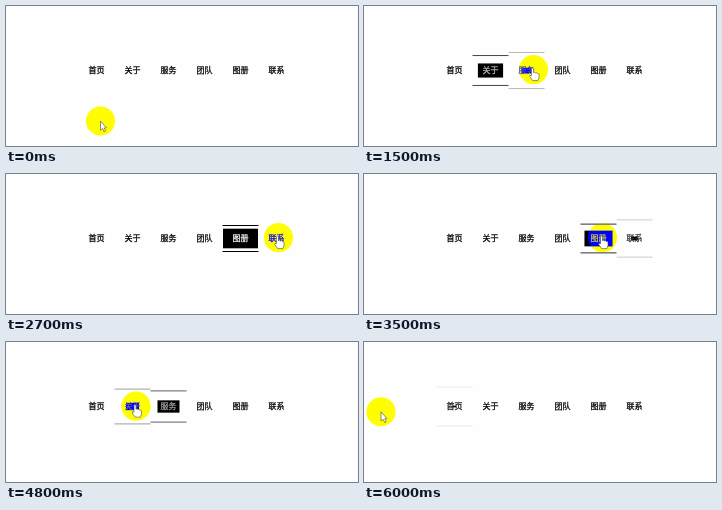
Recreate the animation shown at these times as an HTML page. Size 352x140 px, loop 6100 ms.

```html
<!DOCTYPE html>
<html lang="zh">
<head>
<meta charset="utf-8">
<title>Menu hover</title>
<style>
  html, body { margin: 0; width: 100%; height: 100%; overflow: hidden; background: #fefefe; }
  svg { display: block; width: 352px; height: 140px; isolation: isolate; }
  text { font: 500 8px "Noto Sans CJK SC", "Noto Sans CJK", sans-serif; text-anchor: middle; stroke-width: .25px; }
  #spot { fill: #00f; mix-blend-mode: difference; }
  #pointer path { fill: #fff; stroke: #445; stroke-width: .6; stroke-linejoin: round; }
</style>
</head>
<body>
<svg viewBox="0 0 352 140">
  <rect width="352" height="140" fill="#fefefe"/>
  <g id="menu"></g>
  <circle id="spot" r="14.6"/>
  <g id="pointer">
    <path id="arrow" d="M0 0V9.3L2.1 7.4L3.6 10.8L5.1 10.1L3.7 6.9H6Z"/>
    <path id="hand" d="M-2-1Q-1-2.2 0-1V3Q1.2 2.2 1.9 3.3Q3.1 2.7 3.8 3.8Q5.3 3.5 5.5 5V8L4.4 11H-.8L-3.8 6.8Q-4.2 5.2-2 6Z"/>
  </g>
</svg>
<script>
const LOOP = 6100, STEP = 100, FADE = 300, LAG = 60;
const LEFT = 72.5, PITCH = 36, MID = 64.5, REST = 63.6;
const labels = ['首页', '关于', '服务', '团队', '图册', '联系'];

// pointer travel: time, x
const sweep = [
  [0, 94.5], [700, 91.5], [1250, 117], [1500, 169.5], [1900, 174], [2100, 209],
  [2600, 240], [2700, 272.5], [2900, 287], [3100, 265], [3500, 238.5],
  [4200, 178], [4500, 163], [4800, 130], [4900, 116], [5700, 82], [6000, 17]
];

const $ = id => document.getElementById(id);

function set(el, attrs) {
  for (const k in attrs) el.setAttribute(k, attrs[k]);
}

function make(tag, attrs, parent) {
  const el = document.createElementNS('http://www.w3.org/2000/svg', tag);
  set(el, attrs);
  return parent.appendChild(el);
}

// cubic-bezier(.25, .1, .25, 1)
function ease(x) {
  if (x <= 0) return 0;
  if (x >= 1) return 1;
  let lo = 0, hi = 1, u;
  for (let i = 0; i < 20; i++) {
    u = (lo + hi) / 2;
    const bx = .75 * u * (1 - u) + u ** 3;
    if (bx < x) lo = u; else hi = u;
  }
  return .3 * u * (1 - u) ** 2 + 3 * u * u * (1 - u) + u ** 3;
}

function position(t) {
  const n = Math.max(1, sweep.findIndex(k => k[0] >= t));
  const [t0, x0] = sweep[n - 1], [t1, x1] = sweep[n];
  const x = x0 + (x1 - x0) * Math.min(1, (t - t0) / (t1 - t0));
  const rise = 51.4 * Math.exp(-((t / 375) ** 1.5));
  const dip = t > 700 ? 12 * Math.exp(-(((x - 116) / 8) ** 2)) : 0;
  const exit = Math.max(0, LEFT - x) / 9;
  return [x, REST + rise + dip + exit];
}

function itemAt(t) {
  const [x, y] = position(t);
  const i = Math.floor((x - LEFT) / PITCH);
  return y < 82 && labels[i] ? i : -1;
}

// follow the pointer once to find when each item is entered and left
const visits = [];
for (let t = 0, last = -1; t <= 6000 - LAG; t += 2) {
  const item = itemAt(t);
  if (item === last) continue;
  if (last >= 0) visits[visits.length - 1].leave = t + LAG;
  if (item >= 0) visits.push({ item, enter: t + LAG, leave: LOOP });
  last = item;
}

function level(item, t) {
  const levels = visits.filter(v => v.item === item && t >= v.enter).map(v =>
    t < v.leave ? ease((t - v.enter) / FADE) : 1 - ease((t - v.leave) / FADE));
  return Math.max(0, ...levels);
}

const items = labels.map((label, i) => {
  const g = make('g', { transform: `translate(${LEFT + PITCH * (i + .5)} ${MID})` }, $('menu'));
  const line = () => make('rect', { x: -PITCH / 2, width: PITCH, height: 1 }, g);
  const top = line(), bottom = line();
  const box = make('rect', { x: -17.5, y: -9.8, width: 35, height: 19.6 }, g);
  const text = make('text', { y: 2.8 }, g);
  text.textContent = label;
  return { top, bottom, box, text };
});

function draw(t) {
  items.forEach(({ top, bottom, box, text }, i) => {
    const p = level(i, t), reach = 20 - 7 * p, shade = Math.round(255 * p);
    const ink = `rgb(${shade},${shade},${shade})`;
    set(top, { y: -reach - .5, opacity: p });
    set(bottom, { y: reach - .5, opacity: p });
    set(box, { transform: `scale(${p})` });
    set(text, { fill: ink, stroke: ink });
  });
  const [x, y] = position(t), over = itemAt(t) >= 0;
  set($('spot'), { cx: x, cy: y });
  set($('pointer'), { transform: `translate(${x} ${y})` });
  $('hand').style.display = over ? '' : 'none';
  $('arrow').style.display = over ? 'none' : '';
}

const start = performance.now();
function tick() {
  const t = (performance.now() - start) % LOOP;
  draw(Math.floor(t / STEP) * STEP);
  requestAnimationFrame(tick);
}
tick();
</script>
</body>
</html>
```
